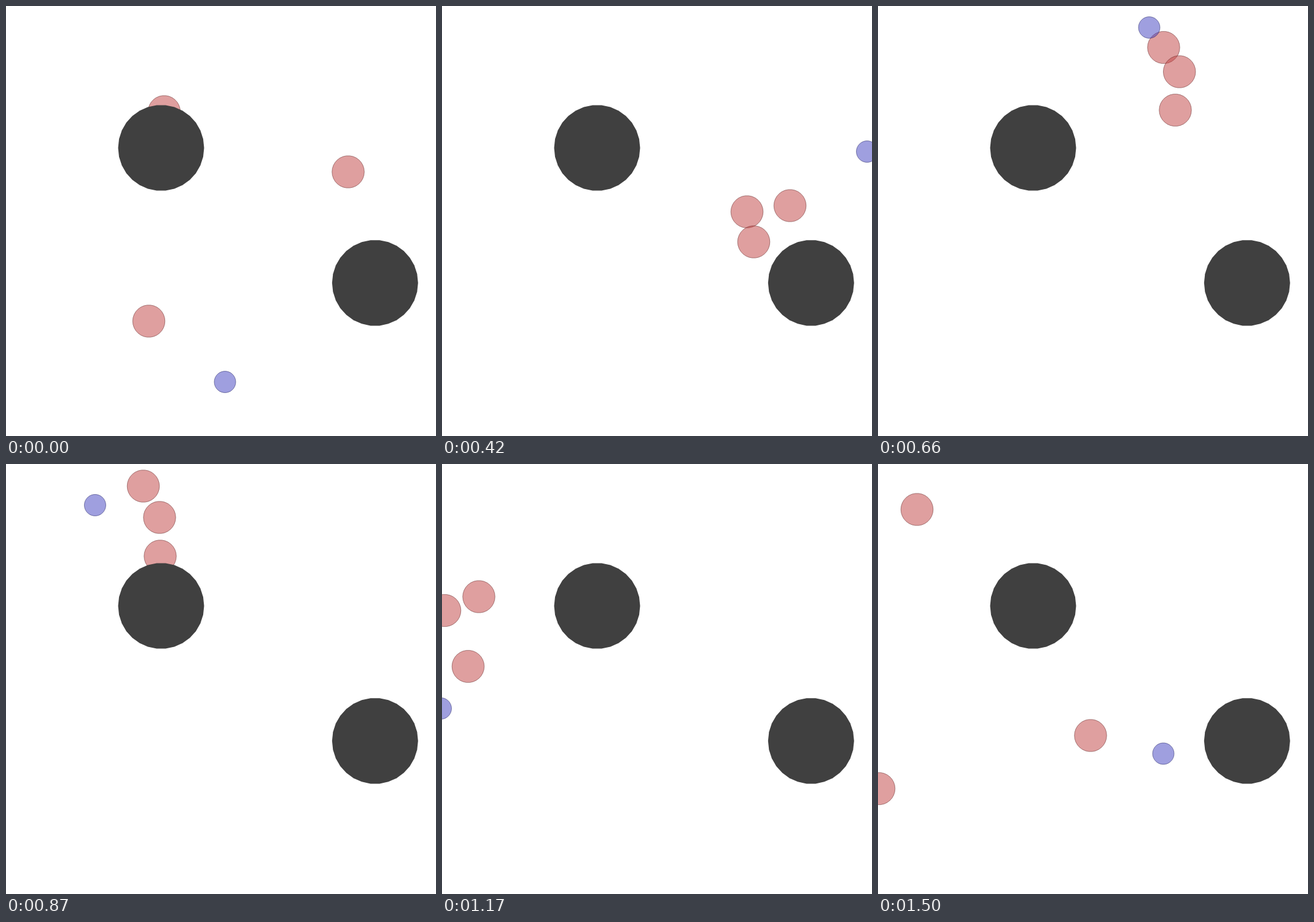
Write an HTML page with a canvas that moves like this. It is 700 px wide and 700 px high and loops after 1.53 s.

```html
<!DOCTYPE html>
<html lang="en">
<head>
<meta charset="utf-8">
<title>Pursuit</title>
<style>
  html, body { margin: 0; height: 100%; overflow: hidden; background: #fff; }
  canvas { display: block; }
</style>
</head>
<body>
<canvas id="stage" width="700" height="700"></canvas>
<script>
const ctx = document.getElementById('stage').getContext('2d');
const LOOP = 1530, STEP = 30, SIDES = 30;

const red = { radius: 26.25, fill: 'rgba(191,64,64,.5)', line: 'rgba(96,32,32,.5)' };
const blue = { radius: 17.5, fill: 'rgba(64,64,191,.5)', line: 'rgba(32,32,96,.5)' };
const dark = { radius: 70, fill: '#404040' };

// Turning points: each agent glides through its x, y pairs at these times (ms)
const times = [0, 210, 420, 660, 870, 1050, 1170, 1500];
const agents = [
  [red, 257.5,172, 360,252, 566.5,325, 484,169.5, 251,150, 115,222, 42.5,329.5, 346,442],
  [red, 557,270, 497,493, 496.5,335, 465,67.5, 223.5,36, 62,123, 4.5,238.5, 63.5-62,528.5],
  [red, 232.5,513, 433.7,583, 507.5,384, 490.7,107, 250,87, 101,140, 60,216, 63.5,74],
  [blue, 356.5,612, 649.5,548, 692,237, 441.5,35, 145,67, -35,225, -2,398, 464.5,471.5]
];

// Smooth curve through values at the shared times
function glide(value, t) {
  const last = times.length - 1;
  const slope = i => (value(i + 1) - value(i)) / (times[i + 1] - times[i]);
  const tangent = i => {
    if (i === 0) return slope(0);
    if (i === last) return slope(last - 1);
    const before = times[i] - times[i - 1], after = times[i + 1] - times[i];
    return (slope(i - 1) * after + slope(i) * before) / (before + after);
  };
  let i = 0;
  while (i < last - 1 && t >= times[i + 1]) i++;
  const span = times[i + 1] - times[i], u = (t - times[i]) / span, w = 1 - u;
  return w * w * (1 + 2 * u) * value(i) + u * u * (3 - 2 * u) * value(i + 1)
    + span * u * w * (w * tangent(i) - u * tangent(i + 1));
}

function disc({ radius, fill, line }, x, y) {
  ctx.beginPath();
  for (let i = 0; i < SIDES; i++) {
    const a = 2 * Math.PI * i / SIDES;
    ctx.lineTo(x + radius * Math.cos(a), y + radius * Math.sin(a));
  }
  ctx.closePath();
  ctx.fillStyle = fill;
  ctx.fill();
  if (!line) return;
  ctx.strokeStyle = line;
  ctx.stroke();
}

function draw(now) {
  const t = Math.floor(now % LOOP / STEP) * STEP;
  ctx.clearRect(0, 0, 700, 700);
  for (const [style, ...path] of agents)
    disc(style, glide(i => path[2 * i], t), glide(i => path[2 * i + 1], t));
  disc(dark, 252.5, 231);
  disc(dark, 600.8, 450.8);
  requestAnimationFrame(draw);
}
requestAnimationFrame(draw);
</script>
</body>
</html>
```
